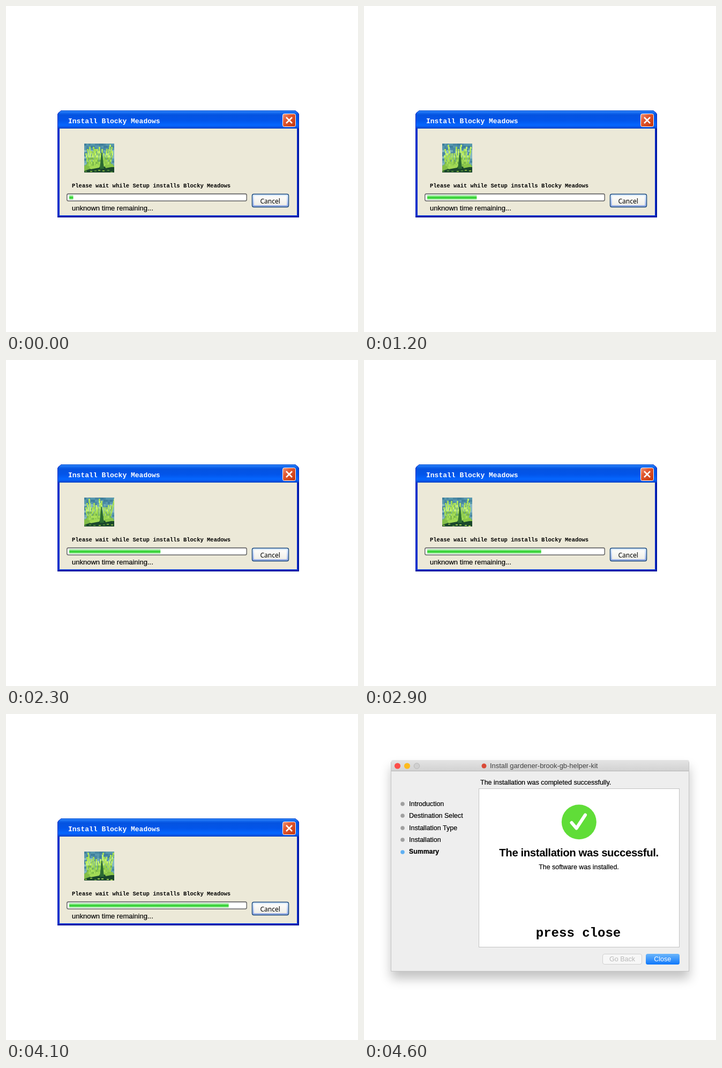
Recreate the animation shown at these times as an HTML page with a canvas. Size 657 by 609 pixels, loop 9.6 s.

```html
<!DOCTYPE html>
<html lang="en">
<head>
<meta charset="utf-8">
<title>Installer</title>
<style>
  html, body { margin: 0; width: 100%; height: 100%; overflow: hidden; background: #fff; }
  svg { position: absolute; left: 0; top: 0; display: block; }
  canvas { position: absolute; left: 146px; top: 257px; }
  text { font: 12.5px "Liberation Sans", Arial, sans-serif; white-space: pre; }
  .mono { font-family: "Liberation Mono", monospace; font-weight: bold; }
  .ink { stroke: #000; stroke-width: .2px; }
  .setup { animation: setup 9600ms step-end infinite; }
  .done { animation: done 9600ms step-end infinite; }
  #bar { animation: fill 9600ms infinite; }
  .shadow { filter: drop-shadow(0 14px 10px rgba(0, 0, 0, .24)); }
  @keyframes setup { 0% { visibility: visible } 47.9167%, 100% { visibility: hidden } }
  @keyframes done { 0% { visibility: hidden } 47.9167%, 100% { visibility: visible } }
  @keyframes fill {
    0% { width: 7.5px; animation-timing-function: steps(46, end) }
    47.9167%, 100% { width: 333px }
  }
</style>
</head>
<body>
<svg width="657" height="609" viewBox="0 0 657 609">
  <defs>
    <linearGradient id="caption" x2="0" y2="1">
      <stop offset="0" stop-color="#0a4fd0"/><stop offset=".06" stop-color="#2a80f8"/>
      <stop offset=".14" stop-color="#1268ee"/><stop offset=".25" stop-color="#0553e0"/>
      <stop offset=".55" stop-color="#0255ea"/><stop offset=".82" stop-color="#0566ff"/>
      <stop offset=".92" stop-color="#0455e6"/><stop offset="1" stop-color="#023fbe"/>
    </linearGradient>
    <linearGradient id="red" x2="1" y2="1">
      <stop offset="0" stop-color="#f09a7c"/><stop offset=".35" stop-color="#e25a33"/>
      <stop offset="1" stop-color="#c23308"/>
    </linearGradient>
    <linearGradient id="green" x2="0" y2="1">
      <stop offset="0" stop-color="#d4f6d4"/><stop offset=".3" stop-color="#7be57b"/>
      <stop offset=".5" stop-color="#2bd02b"/><stop offset=".68" stop-color="#43d643"/>
      <stop offset="1" stop-color="#d0f5d0"/>
    </linearGradient>
    <linearGradient id="track" x2="0" y2="1">
      <stop offset="0" stop-color="#c4c4c4"/><stop offset=".25" stop-color="#fff"/>
      <stop offset=".8" stop-color="#fff"/><stop offset="1" stop-color="#e6e6e6"/>
    </linearGradient>
    <linearGradient id="button" x2="0" y2="1">
      <stop offset="0" stop-color="#fff"/><stop offset=".8" stop-color="#f1f0ea"/>
      <stop offset="1" stop-color="#dcd8ce"/>
    </linearGradient>
    <linearGradient id="ring" x2="0" y2="1">
      <stop offset="0" stop-color="#cee4ff"/><stop offset="1" stop-color="#7f9de8"/>
    </linearGradient>
    <linearGradient id="titlebar" x2="0" y2="1">
      <stop offset="0" stop-color="#e4e4e4"/><stop offset="1" stop-color="#d2d2d2"/>
    </linearGradient>
    <linearGradient id="blue" x2="0" y2="1">
      <stop offset="0" stop-color="#6cb6fb"/><stop offset="1" stop-color="#0f78fb"/>
    </linearGradient>
  </defs>

  <g class="setup">
    <path d="M96 202L98 199L103 195H540L545 199L547 202V395H96Z" fill="#0a28c4"/>
    <path d="M97 203L99 199L104 195H539L544 199L546 203V229H97Z" fill="url(#caption)"/>
    <path d="M98.5 229V391.5H544" fill="none" stroke="#0b44dc"/>
    <path d="M546 229V394H96" fill="none" stroke="#0018a0" stroke-width="2"/>
    <path d="M100 229H543V391H100Z" fill="#ece9d8"/>
    <text class="mono" x="116" y="219" fill="#fff" style="font-size:13px">Install Blocky Meadows</text>
    <rect x="516.5" y="201.5" width="24" height="24" rx="3" fill="url(#red)" stroke="#fff"/>
    <path d="M523 208L534 219M534 208L523 219" stroke="#fff" stroke-width="2.6"/>

    <text class="mono" x="123" y="338.5" style="font-size:10.5px">Please wait while Setup installs Blocky Meadows</text>
    <rect x="113.75" y="350.75" width="335.5" height="13.5" rx="3" fill="url(#track)" stroke="#686868" stroke-width="1.5"/>
    <rect id="bar" x="118" y="353" width="7.5" height="9" fill="url(#green)"/>
    <text class="ink" x="123" y="382" style="font-size:13px">unknown time remaining...</text>

    <rect x="459.5" y="351.5" width="68" height="24" rx="3" fill="url(#button)" stroke="#0d3f77" stroke-width="1.4"/>
    <rect x="461.5" y="353.5" width="64" height="20" rx="1" fill="none" stroke="url(#ring)" stroke-width="2"/>
    <text x="474.5" y="369" style="font:12px 'Noto Sans',sans-serif">Cancel</text>
  </g>

  <g class="done">
    <rect class="shadow" x="50.5" y="86" width="556.5" height="394.5" rx="4" fill="#eee"/>
    <path d="M50.5 106V90Q51 86 55 86H603Q607 86 607 90V106Z" fill="url(#titlebar)"/>
    <path d="M51 106.5H607" stroke="#b4b4b4"/>
    <path d="M50.5 90V480.5H606.5V90" fill="none" stroke="#c4c4c4"/>
    <circle cx="62.5" cy="97" r="5.6" fill="#fc4d49"/>
    <circle cx="80.5" cy="97" r="5.6" fill="#fdbb1e"/>
    <circle cx="98.5" cy="97" r="5.2" fill="#d0d0d0" stroke="#b8b8b8"/>
    <circle cx="224" cy="97" r="4.5" fill="#d94a38"/>
    <text x="235" y="101" fill="#404040" style="font-size:12.9px">Install gardener-brook-gb-helper-kit</text>
    <text class="ink" x="217" y="131.5">The installation was completed successfully.</text>

    <g fill="#a0a0a0">
      <circle cx="72" cy="168" r="3.8"/><circle cx="72" cy="190" r="3.8"/>
      <circle cx="72" cy="213" r="3.8"/><circle cx="72" cy="235" r="3.8"/>
      <circle cx="72" cy="258" r="3.8" fill="#5fb0f3"/>
    </g>
    <g class="ink">
      <text x="84" y="171.5">Introduction</text>
      <text x="84" y="193.5">Destination Select</text>
      <text x="84" y="216.5">Installation Type</text>
      <text x="84" y="238.5">Installation</text>
      <text x="84" y="261" style="font-size:12.3px;font-weight:bold">Summary</text>
    </g>

    <rect x="214.5" y="139.5" width="374" height="296" fill="#fff" stroke="#c2c2c2"/>
    <circle cx="401.3" cy="201.7" r="32.5" fill="#60dd38"/>
    <path d="M387.5 203L396.5 213.5L413 188.5" fill="none" stroke="#fff" stroke-width="6" stroke-linecap="round" stroke-linejoin="round"/>
    <text x="401" y="265.5" text-anchor="middle" style="font-size:20.4px;font-weight:bold;letter-spacing:-.02em">The installation was successful.</text>
    <text class="ink" x="401" y="290" text-anchor="middle" style="font-size:12.4px">The software was installed.</text>
    <text class="mono" x="400" y="416" text-anchor="middle" style="font-size:24px">press close</text>

    <rect x="445.5" y="448.5" width="73" height="19" rx="3.5" fill="#f7f7f7" stroke="#d0d0d0"/>
    <text x="482" y="462.3" text-anchor="middle" fill="#b8b8b8">Go Back</text>
    <rect x="526" y="448" width="63" height="20" rx="3.5" fill="url(#blue)"/>
    <text x="557.3" y="462.3" text-anchor="middle" fill="#fff">Close</text>
  </g>
</svg>
<canvas class="setup" width="56" height="54"></canvas>

<script>
const ctx = document.querySelector('canvas').getContext('2d');
const pick = (list, r) => list[Math.floor(r * list.length)];

function seeded(seed) {
  return () => (seed = seed * 16807 % 2147483647) / 2147483647;
}

function block(color, x, y, w, h) {
  ctx.fillStyle = color;
  ctx.fillRect(Math.round(x), Math.round(y), w, h);
}

function shape(color, ...points) {
  ctx.fillStyle = color;
  ctx.beginPath();
  points.forEach(([x, y]) => ctx.lineTo(x, y));
  ctx.fill();
}

function drawGrass(step) {
  const rand = seeded(4711);
  const phase = step * Math.PI / 14;

  for (let y = 0; y < 42; y += 4)
    for (let x = 0; x < 56; x += 4) {
      const tones = y < 10 ? ['#3f7f9c', '#4a88a4', '#5898ae'] : ['#5c9cb0', '#86b9c2', '#6fa9b5', '#4a88a0'];
      block(pick(tones, rand()), x, y, 4, 4);
    }

  shape('#82bd48', [0, 42], [10, 34], [46, 34], [56, 42], [56, 54], [0, 54]);
  shape('#1a472c', [0, 51], [12, 47], [33, 43], [56, 44], [56, 54], [0, 54]);

  // Each blade is a stack of blocks that leans outwards and sways.
  for (let i = 0; i < 14; i++) {
    const root = 8 + i * 3.1;
    const lean = (root - 28) * 0.01;
    const top = 4 + rand() * 17 + 2 * Math.cos(phase - 1.8 + i);
    const sway = Math.sin(phase + i * 0.7) * 1.6;
    for (let y = 42; y > top; y -= 4) {
      const rise = (42 - y) / 36;
      const color = rise > 0.4
        ? pick(['#c0f070', '#b0e45f', '#a2da55'], rand())
        : pick(['#a8e05a', '#92cf50', '#9cd653', '#7cb94a'], rand());
      block(color, root + lean * (42 - y) + sway * rise * rise - 2, y - 4, 3, 4);
    }
  }

  const tip = 32 + Math.sin(phase);
  shape('#2c6b34', [tip, 17], [tip + 1.5, 17], [37, 47], [29, 47]);
  shape('#a2da55', [9, 43], [29, 39], [28, 45], [12, 48]);
  shape('#8ac748', [38, 40], [53, 38], [55, 43], [40, 46]);
  for (let i = 0; i < 7; i++)
    block(pick(['#7fae3f', '#99c850', '#4f8638'], rand()), i * 8 + rand() * 4, 49 + rand() * 3, 4, 2);
}

let lastStep = -1;
function frame(now) {
  const step = Math.min(45, Math.floor(now % 9600 / 100));
  if (step !== lastStep) drawGrass(lastStep = step);
  requestAnimationFrame(frame);
}
drawGrass(0);
requestAnimationFrame(frame);
</script>
</body>
</html>
```
